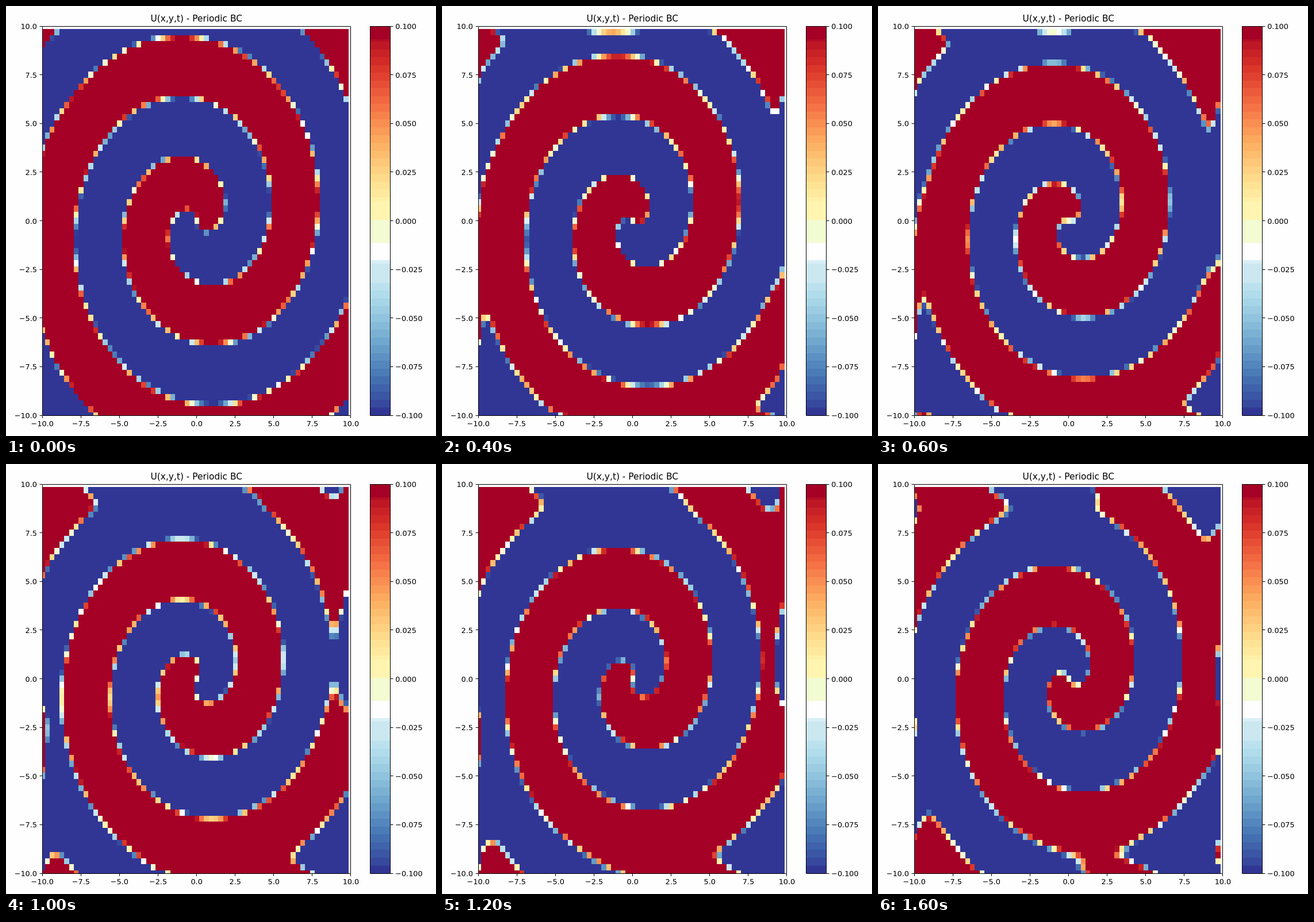
An HTML page with a canvas for the animation above (1800 ms loop, 748 by 748 pixels).

```html
<!DOCTYPE html>
<html lang="en">
<head>
<meta charset="utf-8">
<title>Spiral wave</title>
<style>
  html, body { margin: 0; width: 100%; height: 100%; overflow: hidden; background: #fefefe; }
  canvas, svg { position: absolute; left: 0; top: 0; width: 748px; height: 748px; }
  text { font: 12.85px "DejaVu Sans", sans-serif; fill: #000; }
  .title { font-size: 15.42px; }
  .mid { text-anchor: middle; }
  .end { text-anchor: end; }
  path { fill: none; stroke: #000; stroke-width: 1; }
</style>
</head>
<body>
<canvas id="plot" width="748" height="748"></canvas>
<svg id="axes" viewBox="0 0 748 748">
  <path d="M63.5 35.5H599.5V712.5H63.5ZM633.5 35.5H668.5V712.5H633.5Z"/>
  <text class="title mid" x="331.3" y="27.2">U(x,y,t) - Periodic BC</text>
</svg>
<script>
const N = 64, SIZE = N * N, L = 20, BETA = 1, DIFF = 0.1;
const FRAMES = 9, HOLD = 200, GAP = 0.5, SUB = 8;
const LEFT = 63.5, RIGHT = 600, TOP = 35, BOTTOM = 712;

// Axis ticks and labels
const svg = document.getElementById('axes');
const add = (tag, attrs, text = '') => {
  const el = document.createElementNS('http://www.w3.org/2000/svg', tag);
  for (const k in attrs) el.setAttribute(k, attrs[k]);
  el.textContent = text;
  svg.append(el);
};
const label = (v, digits) => v.toFixed(digits).replace('-', '\u2212');
for (let i = 0; i <= 8; i++) {
  const v = -10 + 2.5 * i;
  const x = Math.floor(63 + 67.1 * i) + 0.5;
  const yRaw = BOTTOM - (BOTTOM - TOP) * i / 8;
  const y = Math.floor(yRaw) + 0.5;
  add('path', { d: `M${x} 713v4M63 ${y}h-4.5M669 ${y}h4.5` });
  add('text', { class: 'mid', x: 63.2 + 67.1 * i, y: 731.4 }, label(v, 1));
  add('text', { class: 'end', x: 54, y: yRaw + 5 }, label(v, 1));
  add('text', { x: 677.2, y: yRaw + 5 }, label(v / 100, 3));
}

// Banded red-yellow-blue colour scale over [-0.1, 0.1]
const stops = ['313695', '4575b4', '74add1', 'abd9e9', 'e0f3f8', 'ffffbf',
  'fee090', 'fdae61', 'f46d43', 'd73027', 'a50026']
  .map(h => [0, 2, 4].map(i => parseInt(h.slice(i, i + 2), 16)));
const pale = [[0.39, '#cbe8f1'], [0.399, '#d9eff6'], [0.443, '#fefefe'],
  [0.502, '#f3fbd2'], [0.55, '#fff5b0']];
function color(v) {
  const q = (v + 0.1) / 0.2;
  if (q < 0.018) return '#313695';
  if (q > 0.966) return '#a50026';
  if (q > 0.342 && q < 0.55) return pale.find(p => q <= p[0])[1];
  const s = (Math.floor(q * 50) + 0.5) / 5;
  const i = Math.floor(s), f = s - i;
  return `rgb(${stops[i].map((c, k) => Math.round(c + (stops[i + 1][k] - c) * f))})`;
}

// Spectral second derivative on the periodic grid
const h = 2 * Math.PI / N, scale = DIFF * (2 * Math.PI / L) ** 2;
const D2 = new Float64Array(SIZE);
for (let i = 0; i < N; i++) {
  for (let j = 0; j < N; j++) {
    const d = i - j;
    D2[i * N + j] = scale * (d
      ? (d & 1 ? 0.5 : -0.5) / Math.sin(d * h / 2) ** 2
      : -(N * N / 12 + 1 / 6));
  }
}

// Lambda-omega reaction-diffusion; state holds u, then v
function rhs(s, out) {
  for (let i = 0; i < N; i++) {
    for (let j = 0; j < N; j++) {
      const a = i * N, b = j * N, p = a + j;
      let lu = 0, lv = 0;
      for (let k = 0; k < N; k++) {
        const dx = D2[b + k], dy = D2[a + k], col = k * N + j;
        lu += dx * s[a + k] + dy * s[col];
        lv += dx * s[SIZE + a + k] + dy * s[SIZE + col];
      }
      const u = s[p], v = s[SIZE + p], A = u * u + v * v;
      out[p] = (1 - A) * u + BETA * A * v + lu;
      out[SIZE + p] = (1 - A) * v - BETA * A * u + lv;
    }
  }
}

const vec = () => new Float64Array(2 * SIZE);
const state = vec(), probe = vec(), slope = vec(), sum = vec();
function step(dt) {
  sum.fill(0);
  probe.set(state);
  for (const [w, next] of [[1, 0.5], [2, 0.5], [2, 1], [1, 0]]) {
    rhs(probe, slope);
    for (let i = 0; i < 2 * SIZE; i++) {
      sum[i] += w * slope[i];
      probe[i] = state[i] + next * dt * slope[i];
    }
  }
  for (let i = 0; i < 2 * SIZE; i++) state[i] += dt / 6 * sum[i];
}

for (let i = 0; i < N; i++) {
  for (let j = 0; j < N; j++) {
    const x = (j / N - 0.5) * L, y = (i / N - 0.5) * L;
    const r = Math.hypot(x, y), phase = Math.atan2(y, x) - r;
    state[i * N + j] = Math.tanh(r) * Math.cos(phase);
    state[SIZE + i * N + j] = Math.tanh(r) * Math.sin(phase);
  }
}
const frames = [];
for (let f = 0; f < FRAMES; f++) {
  frames.push(state.slice(0, SIZE));
  if (f < FRAMES - 1) for (let n = 0; n < SUB; n++) step(GAP / SUB);
}

// Painting: cells are centred on the grid points and clipped to the axes
const ctx = document.getElementById('plot').getContext('2d');
for (let y = TOP; y < BOTTOM; y++) {
  ctx.fillStyle = color(0.1 - 0.2 * (y + 0.5 - TOP) / (BOTTOM - TOP));
  ctx.fillRect(633, y, 36, 1);
}
const edgeX = j => Math.round(Math.max(LEFT, LEFT + (j - 0.5) * (RIGHT - LEFT) / N));
const edgeY = i => Math.round(Math.min(BOTTOM, BOTTOM - (i - 0.5) * (BOTTOM - TOP) / N));
function paint(u) {
  for (let i = 0; i < N; i++) {
    const y = edgeY(i + 1), hgt = edgeY(i) - y;
    for (let j = 0; j < N; j++) {
      const x = edgeX(j);
      ctx.fillStyle = color(u[i * N + j]);
      ctx.fillRect(x, y, edgeX(j + 1) - x, hgt);
    }
  }
}

let shown = 0;
paint(frames[0]);
const start = performance.now();
function tick() {
  const f = Math.floor((performance.now() - start) / HOLD) % FRAMES;
  if (f !== shown) paint(frames[shown = f]);
  requestAnimationFrame(tick);
}
requestAnimationFrame(tick);
</script>
</body>
</html>
```
